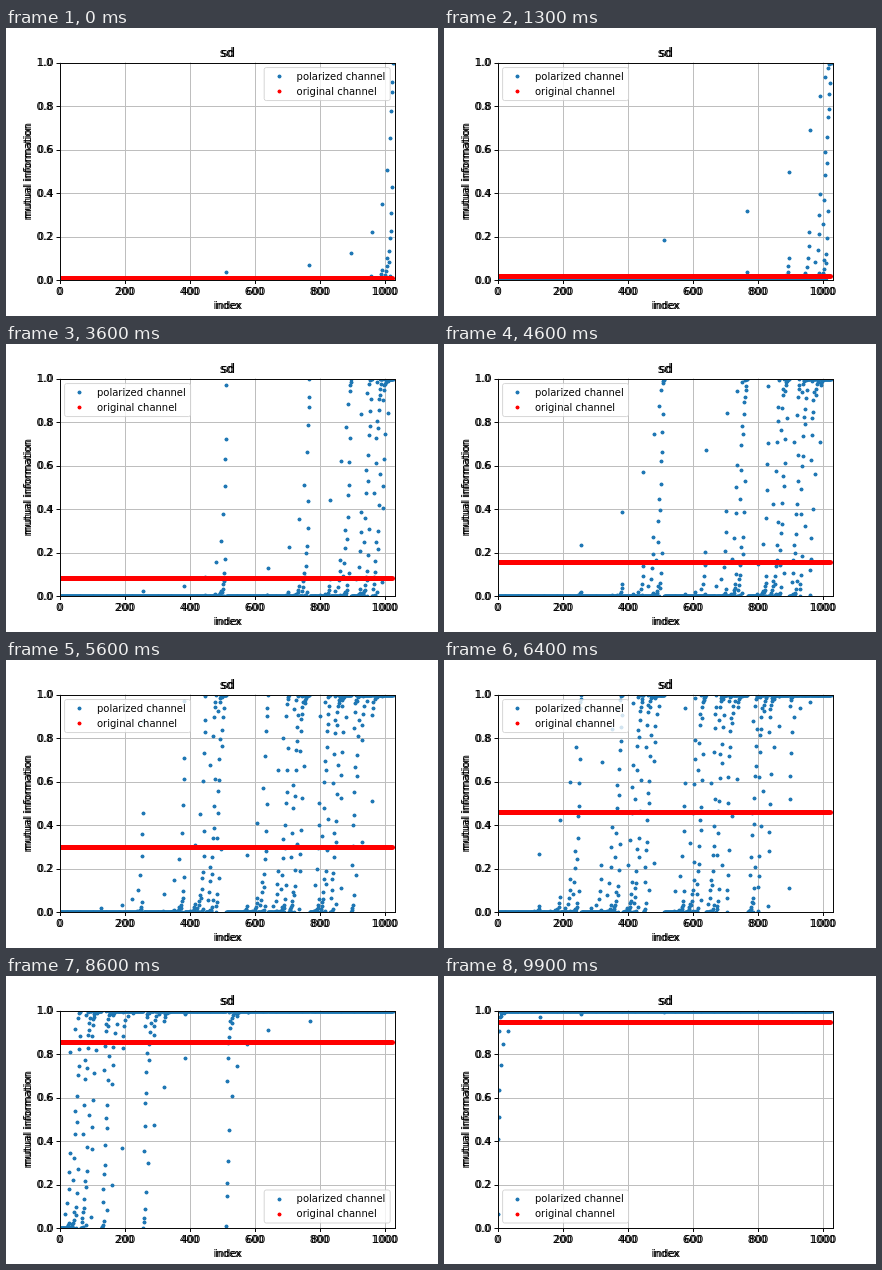
Write an HTML page with a canvas that moves like this. It is 432x288 px and loops after 10 s.

```html
<!DOCTYPE html>
<html lang="en">
<head>
<meta charset="utf-8">
<title>Channel polarization</title>
<style>
html, body { margin: 0; width: 100%; height: 100%; overflow: hidden; background: #fff; }
canvas { display: block; width: 432px; height: 288px; }
</style>
</head>
<body>
<canvas id="plot" width="432" height="288"></canvas>
<script>
const ctx = document.getElementById('plot').getContext('2d');
const STEPS = 100, STEP_MS = 100, LEVELS = 10;
const LEFT = 54, RIGHT = 388.8, TOP = 34.56, BOTTOM = 252;
const BLUE = '#1f77b4', RED = '#ff0000';
const FONT = '"DejaVu Sans", sans-serif';
const px = i => LEFT + i * (RIGHT - LEFT) / 1030;
const py = v => BOTTOM - v * (BOTTOM - TOP);
const snap = v => Math.round(v) + 0.5;

// --- Density evolution with Gaussian LLRs of mean m ---

// log(1 - E[tanh(L/2)])
function logPhi(m) {
  const s = Math.sqrt(2 * m), h = Math.min(0.25, s / 4), end = Math.min(60, 9 * s);
  let sum = 0.5;
  for (let l = h; l < end; l += h) sum += Math.exp(-l * l / (4 * m)) / Math.cosh(l / 2);
  return -m / 4 - Math.log(4 * Math.PI * m) / 2 + Math.log(2 * h * sum);
}

const X0 = -6, DX = 0.02, COUNT = 640;
const checkTable = buildCheckTable();

function buildCheckTable() {
  const logs = Array.from({ length: COUNT }, (_, i) => logPhi(Math.exp(X0 + i * DX)));
  const odds = logs.map(p => Math.log1p(-Math.exp(p)) - p);
  let j = 0;
  return logs.map(p => {
    const phi = Math.exp(p), logT = Math.log1p(-phi);
    const y = 2 * logT - p - Math.log(2 - phi);
    if (y <= odds[0]) return Math.LN2 + 2 * logT;
    while (odds[j + 1] < y) j++;
    return X0 + DX * (j + (y - odds[j]) / (odds[j + 1] - odds[j]));
  });
}

function checkNode(m) {
  if (m < 1e-150) return 0;
  const k = (Math.log(m) - X0) / DX;
  if (k < 0) return m * m / 2 * (1 - m);
  if (k >= COUNT - 1) return m - 4 * Math.LN2;
  const i = Math.floor(k), a = checkTable[i];
  return Math.exp(a + (checkTable[i + 1] - a) * (k - i));
}

// mutual information of a Gaussian LLR channel
function info(m) {
  return Math.pow(1 - Math.pow(2, -0.3073 * Math.pow(2 * m, 0.8935)), 1.1064);
}

// SNR sweep in 0.3 dB steps, closing on 10 dB
function snrDb(step) {
  return step < STEPS - 1 ? -20 + 0.3 * step : 10;
}

function polarize(step) {
  let means = [2 * Math.pow(10, snrDb(step) / 10)];
  for (let k = 0; k < LEVELS; k++) means = means.flatMap(m => [checkNode(m), 2 * m]);
  return means.map(info);
}

// unpolarized channel: logistic curve with a slightly steeper upper part
function baseInfo(step) {
  const bend = 4.6 * Math.log1p(Math.exp((step - 47) / 4.6));
  return 1 / (1 + Math.exp(4.93 - 0.0698 * step - 0.018 * bend));
}

// --- Legend placement: the spot covering the least data ---

const BOX_W = 125.2, BOX_H = 33, GAP = 5;
const lx = [LEFT + GAP, (LEFT + RIGHT - BOX_W) / 2, RIGHT - GAP - BOX_W];
const ly = [TOP + GAP, (TOP + BOTTOM - BOX_H) / 2, BOTTOM - GAP - BOX_H];
const SPOTS = [[2, 0], [0, 0], [0, 2], [2, 2], [2, 1], [0, 1], [1, 2], [1, 0], [1, 1]]
  .map(([c, r]) => [lx[c], ly[r]]);

function cost([x, y], ys, lineY) {
  const low = y + BOX_H;
  const onLine = lineY > y && lineY < low;
  let hits = onLine ? 1 : 0, crossed = 0;
  ys.forEach((v, i) => {
    const p = px(i);
    if (p <= x || p >= x + BOX_W) return;
    if (v > y && v < low) hits++;
    if (onLine) hits++;
    const prev = ys[i - 1];
    if (Math.min(v, prev) < low && Math.max(v, prev) > y) crossed = 1;
  });
  return hits + crossed;
}

function bestSpot(ys, lineY) {
  const costs = SPOTS.map(s => cost(s, ys, lineY));
  return SPOTS[costs.indexOf(Math.min(...costs))];
}

// --- Drawing ---

function line(x1, y1, x2, y2) {
  ctx.beginPath();
  ctx.moveTo(x1, y1);
  ctx.lineTo(x2, y2);
  ctx.stroke();
}

function dot(x, y, color) {
  ctx.fillStyle = color;
  ctx.beginPath();
  ctx.arc(snap(x), snap(y), 2, 0, 2 * Math.PI);
  ctx.fill();
}

function label(text, x, y, align = 'center', size = 10) {
  ctx.font = size + 'px ' + FONT;
  ctx.textAlign = align;
  ctx.fillStyle = '#000';
  ctx.fillText(text, x, y);
}

// axis text is struck twice, slightly apart
function heavy(text, x, y, align, size) {
  label(text, x - 0.7, y, align, size);
  label(text, x + 0.7, y, align, size);
}

function eachTick(onX, onY) {
  for (let k = 0; k <= 5; k++) {
    onX(k * 200, px(k * 200));
    onY((k / 5).toFixed(1), py(k / 5));
  }
}

function drawGrid() {
  ctx.strokeStyle = '#bebebe';
  ctx.lineWidth = 1;
  eachTick(
    (_, x) => line(snap(x), TOP, snap(x), BOTTOM),
    (_, y) => line(LEFT, snap(y), RIGHT, snap(y))
  );
}

function drawAxes() {
  ctx.strokeStyle = '#0a0a0a';
  ctx.lineWidth = 1;
  ctx.strokeRect(snap(LEFT), snap(TOP), snap(RIGHT) - snap(LEFT), snap(BOTTOM) - snap(TOP));
  eachTick(
    (name, x) => {
      line(snap(x), 252.5, snap(x), 256);
      heavy(name, x, 267);
    },
    (name, y) => {
      line(50.5, snap(y), 54, snap(y));
      heavy(name, 47, Math.round(y + 3.7), 'right');
    }
  );
  heavy('sd', 221.4, 29, 'center', 12);
  heavy('index', 221.9, 281);
  ctx.save();
  ctx.translate(24.5, 143.7);
  ctx.rotate(-Math.PI / 2);
  heavy('mutual information', 0, 0);
  ctx.restore();
}

function drawLegend([x, y]) {
  ctx.beginPath();
  ctx.roundRect(x - 0.4, y, BOX_W + 0.8, BOX_H, 2);
  ctx.fillStyle = 'rgba(255,255,255,0.8)';
  ctx.fill();
  ctx.strokeStyle = 'rgba(204,204,204,0.8)';
  ctx.lineWidth = 1;
  ctx.stroke();
  [['polarized channel', BLUE], ['original channel', RED]].forEach(([name, color], i) => {
    const mid = y + 8.8 + i * 14.8;
    dot(x + 14, mid, color);
    label(name, x + 32, Math.round(mid + 3.4), 'left');
  });
}

function draw(step) {
  const ys = polarize(step).map(py);
  const lineY = py(baseInfo(step));
  ctx.fillStyle = '#fff';
  ctx.fillRect(0, 0, 432, 288);
  drawGrid();

  ctx.save();
  ctx.beginPath();
  ctx.rect(LEFT, 35, 335, 218);
  ctx.clip();
  ys.forEach((y, i) => dot(px(i), y, BLUE));
  ctx.strokeStyle = RED;
  ctx.lineWidth = 5;
  ctx.lineCap = 'round';
  line(LEFT, snap(lineY), px(1023), snap(lineY));
  ctx.restore();

  drawAxes();
  drawLegend(bestSpot(ys, lineY));
}

const start = performance.now();
let shown = -1;

function tick() {
  const step = Math.floor((performance.now() - start) / STEP_MS) % STEPS;
  if (step !== shown) draw(shown = step);
  requestAnimationFrame(tick);
}
tick();
</script>
</body>
</html>
```
